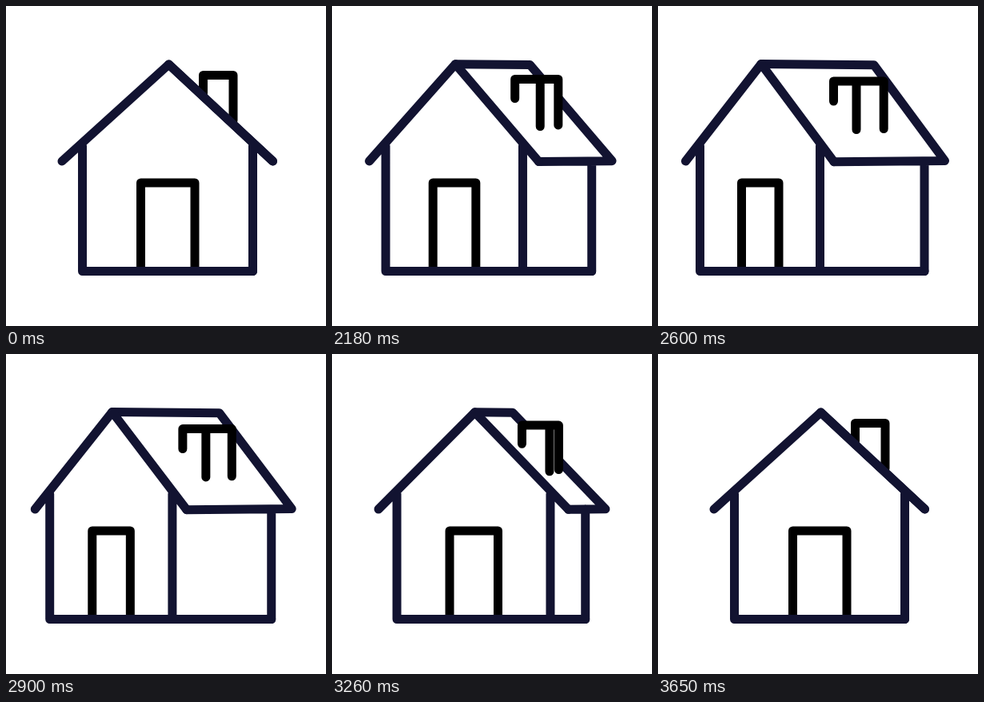
Animation, 400 px wide and 400 px high, one loop 5.69 s. Source, as an HTML page:

```html
<!DOCTYPE html>
<html lang="en">
<head>
<meta charset="utf-8">
<title>Turning house</title>
<style>
html, body { margin: 0; width: 100%; height: 100%; overflow: hidden; background: #fff; }
svg { display: block; width: 100%; height: 100%; }
path { fill: none; stroke-width: 11; stroke-linecap: round; stroke-linejoin: round; }
.ink { stroke: #000; }
.navy { stroke: #121331; }
#chimneyFill { fill: #fff; }
</style>
</head>
<body>
<svg viewBox="0 0 400 400">
  <path class="ink" id="door"/>
  <path class="navy" id="back"/>
  <path id="chimneyFill"/>
  <path class="ink" id="chimney"/>
  <path class="navy" id="front"/>
</svg>
<script>
const LOOP = 5690, STEP = 30, START = 2000, TURNED = 2595, RETURN = 2620, END = 3650;
const draw = (id, d) => document.getElementById(id).setAttribute('d', d);
const clamp = v => Math.min(1, Math.max(0, v));

// CSS-like cubic-bezier easing, solved by bisection
function bezier(x1, y1, x2, y2) {
  const at = (a, b, s) => 3 * (1 - s) ** 2 * s * a + 3 * (1 - s) * s * s * b + s ** 3;
  return u => {
    if (u <= 0 || u >= 1) return clamp(u);
    let lo = 0, hi = 1;
    for (let i = 0; i < 30; i++) {
      const mid = (lo + hi) / 2;
      if (at(x1, x2, mid) < u) lo = mid; else hi = mid;
    }
    return at(y1, y2, lo);
  };
}
const easeOut = bezier(.2, .22, .15, 1);
const easeBack = bezier(.82, 0, .38, 1);

// 0 = seen from the front, 1 = fully turned
function turnAt(ms) {
  const t = Math.floor((ms + 10) / STEP) * STEP - 10;
  return easeOut((t - START) / (TURNED - START)) - easeBack((t - RETURN) / (END - RETURN));
}

function render(ms) {
  const p = turnAt(ms);
  const mix = (from, change) => (from + change * p).toFixed(2);

  const apex = `${mix(203.5, -74.5)} ${mix(73, -.5)}`;
  const eave = `${mix(333.5, -113.5)} ${mix(194, .7)}`;
  const leftWall = mix(95.5, -43), rightWall = mix(308.5, -106), backWall = mix(308.5, 24.5);
  draw('back',
    `M${apex}L${mix(203.5, 66.5)} ${mix(73, .7)}L${mix(333.5, 25)} ${mix(194, -.5)}L${eave}` +
    `M${backWall} 194V331.5`);
  draw('front',
    `M${mix(70, -35.5)} 194L${apex}L${eave}` +
    `M${leftWall} 175V331.5H${backWall}M${rightWall} 175V331.5`);

  draw('door', `M${mix(168.5, -64)} 326V221H${mix(236, -85)}V326`);

  const top = mix(86.5, 7.5);
  const middle = mix(284, -36), middleFoot = mix(143, 11.5);
  const outline = `M${mix(246.5, -27)} ${mix(109, 10)}V${top}H${mix(284, -1.8)}V${mix(140, 13.5)}`;
  draw('chimneyFill', `${outline}L${middle} ${middleFoot}V${mix(140, -21)}Z`);
  draw('chimney', `${outline}M${middle} ${top}V${middleFoot}`);
}

const begin = performance.now();
function tick() {
  render((performance.now() - begin) % LOOP);
  requestAnimationFrame(tick);
}
tick();
</script>
</body>
</html>
```
